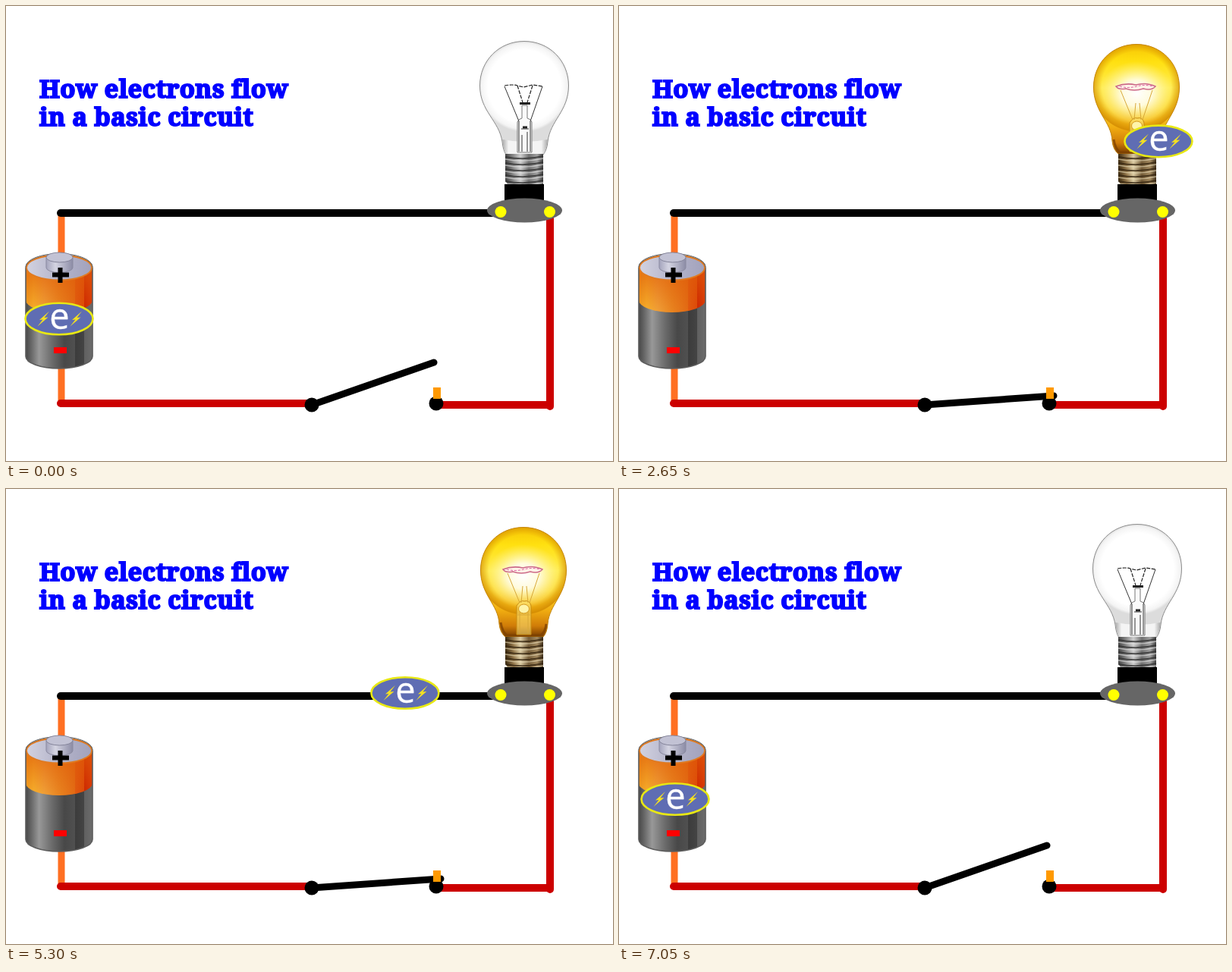
An HTML page for the animation above (7.1 s loop, 800 by 600 pixels).

```html
<!DOCTYPE html>
<html lang="en">
<head>
<meta charset="utf-8">
<title>How electrons flow in a basic circuit</title>
<style>
  html, body { margin: 0; width: 100%; height: 100%; overflow: hidden; background: #fff; }
  svg { display: block; width: 800px; height: 600px; }
  .title { font: bold 33px "Noto Serif", serif; letter-spacing: .34px; fill: #00f; stroke: #00f; stroke-width: 1.9; }
  .letter { font: 47px "Open Sans", "Noto Sans", sans-serif; fill: #fff; stroke: #fff; stroke-width: .4; text-anchor: middle; }
  .wire { fill: none; stroke-linecap: round; stroke-linejoin: round; }
</style>
</head>
<body>
<svg viewBox="0 0 800 600">
  <defs>
    <linearGradient id="orange">
      <stop offset="0" stop-color="#f0a020"/><stop offset=".12" stop-color="#f6b02c"/>
      <stop offset=".28" stop-color="#f0a038"/><stop offset=".5" stop-color="#e88420"/>
      <stop offset=".74" stop-color="#e26a14"/><stop offset=".74" stop-color="#e05a10"/>
      <stop offset=".88" stop-color="#dc4808"/><stop offset=".88" stop-color="#cc2400"/>
      <stop offset="1" stop-color="#d83808"/>
    </linearGradient>
    <linearGradient id="shade" x2="0" y2="1">
      <stop offset=".2" stop-color="#e05c08" stop-opacity=".6"/><stop offset="1" stop-color="#e05c08" stop-opacity="0"/>
    </linearGradient>
    <linearGradient id="grey">
      <stop offset="0" stop-color="#484848"/><stop offset=".08" stop-color="#666"/>
      <stop offset=".2" stop-color="#989898"/><stop offset=".4" stop-color="#6a6a6a"/>
      <stop offset=".58" stop-color="#484848"/><stop offset=".74" stop-color="#505050"/>
      <stop offset=".74" stop-color="#3c3c3c"/><stop offset=".88" stop-color="#444"/>
      <stop offset=".88" stop-color="#606060"/><stop offset="1" stop-color="#6c6c6c"/>
    </linearGradient>
    <linearGradient id="lid">
      <stop offset="0" stop-color="#d2d2e0"/><stop offset=".5" stop-color="#b4b4ca"/>
      <stop offset="1" stop-color="#a2a2bc"/>
    </linearGradient>
    <linearGradient id="knob">
      <stop offset="0" stop-color="#a4a4bc"/><stop offset=".35" stop-color="#d4d4e2"/>
      <stop offset="1" stop-color="#8c8ca6"/>
    </linearGradient>
    <radialGradient id="glass" gradientUnits="userSpaceOnUse" cx="683" cy="106" r="60">
      <stop offset=".8" stop-color="#fff"/><stop offset=".94" stop-color="#f4f4f4"/>
      <stop offset="1" stop-color="#dcdcdc"/>
    </radialGradient>
    <linearGradient id="neck" gradientUnits="userSpaceOnUse" x1="654" x2="714" y1="0" y2="0">
      <stop offset="0" stop-color="#a8a8a8"/><stop offset=".14" stop-color="#f4f4f4"/>
      <stop offset=".86" stop-color="#f4f4f4"/><stop offset="1" stop-color="#a8a8a8"/>
    </linearGradient>
    <linearGradient id="amber" gradientUnits="userSpaceOnUse" x1="0" x2="0" y1="50" y2="195">
      <stop offset="0" stop-color="#f6c404"/><stop offset=".16" stop-color="#ffe010"/>
      <stop offset=".4" stop-color="#ffec50"/><stop offset=".58" stop-color="#fcd830"/>
      <stop offset=".76" stop-color="#f0ac10"/><stop offset=".9" stop-color="#d07c08"/>
      <stop offset="1" stop-color="#783c00"/>
    </linearGradient>
    <radialGradient id="rim" gradientUnits="userSpaceOnUse" cx="682" cy="106" r="60">
      <stop offset=".76" stop-color="#d89000" stop-opacity="0"/><stop offset=".98" stop-color="#d08800" stop-opacity=".8"/>
      <stop offset="1" stop-color="#d08800" stop-opacity="0"/>
    </radialGradient>
    <radialGradient id="glow">
      <stop offset="0" stop-color="#fff"/><stop offset=".4" stop-color="#fffef0" stop-opacity=".9"/>
      <stop offset="1" stop-color="#fff8a0" stop-opacity="0"/>
    </radialGradient>
    <linearGradient id="steel">
      <stop offset="0" stop-color="#444"/><stop offset=".22" stop-color="#8c8c8c"/>
      <stop offset=".4" stop-color="#cfcfcf"/><stop offset=".62" stop-color="#707070"/>
      <stop offset=".84" stop-color="#a0a0a0"/><stop offset="1" stop-color="#404040"/>
    </linearGradient>
    <linearGradient id="bronze">
      <stop offset="0" stop-color="#3c2a10"/><stop offset=".22" stop-color="#94784c"/>
      <stop offset=".4" stop-color="#dccca4"/><stop offset=".62" stop-color="#745c38"/>
      <stop offset=".84" stop-color="#a48a60"/><stop offset="1" stop-color="#40301c"/>
    </linearGradient>
    <path id="bolt" d="M-13-10 -26 1.5 -21.5 1 -28.5 10 -14.500-2 -19.500-1.500Z" fill="#f4e020"/>
    <path id="envelope" d="M682 50.500C714 50.500 738.500 75 738.500 107C738.500 140 716 152 714 178Q713 190 708 195H658Q651 189 650 178C649 152 625.500 140 625.500 107C625.500 75 650 50.500 682 50.500Z"/>
  </defs>

  <rect width="800" height="600" fill="#fff"/>
  <g class="title">
    <text x="44" y="121">How electrons flow</text>
    <text x="44" y="158">in a basic circuit</text>
  </g>

  <!-- wires -->
  <path class="wire" stroke="#ff7022" stroke-width="9" d="M73 275V335M73 470V522"/>
  <path class="wire" stroke="#000" stroke-width="10" d="M72 273H645"/>
  <path class="wire" stroke="#c00" stroke-width="10" d="M72 524H403M572 526H717M717 273V528"/>

  <!-- switch -->
  <circle cx="403" cy="526" r="9.500"/>
  <circle cx="567" cy="524" r="9.500"/>
  <path id="arm" class="wire" stroke="#000" stroke-width="9" d="M403 526L564 470"/>
  <rect x="563" y="503" width="10" height="15" fill="#f90"/>

  <!-- battery -->
  <path fill="url(#grey)" d="M26 345V462A44 16 0 0 0 114 462V345Z"/>
  <path fill="url(#orange)" d="M26 345V388A44 16 0 0 0 114 388V345Z"/>
  <path fill="url(#shade)" d="M26 345V388A44 16 0 0 0 114 388V345Z"/>
  <path fill="none" stroke="#5c5c5c" stroke-width="1.600" d="M26 345V462A44 16 0 0 0 114 462V345A44 17 0 0 0 26 345"/>
  <ellipse cx="70" cy="345" rx="43" ry="16.500" fill="url(#lid)" stroke="#e07a20" stroke-width="1.800"/>
  <path fill="none" stroke="#6a6a6a" d="M26 344A44 17.500 0 0 1 114 344"/>
  <path fill="url(#knob)" stroke="#8a8aa0" d="M53 331V345A17.500 6.500 0 0 0 88 345V331Z"/>
  <ellipse cx="70.500" cy="331.500" rx="17.500" ry="6.500" fill="#c2c2d4" stroke="#84849a"/>
  <path stroke="#000" stroke-width="6" d="M61 354.500H83M71.500 345V365"/>
  <rect x="63" y="450" width="17" height="8" fill="#f00"/>

  <!-- unlit bulb -->
  <g id="unlit">
    <path fill="url(#glass)" stroke="#8c8c8c" d="M683 46.500C716 46.500 741.500 72 741.500 105C741.500 139 717 151 714 179Q713 190 708 196H659Q655 190 654 179C650 151 624.500 139 624.500 105C624.500 72 650 46.500 683 46.500Z"/>
    <path fill="url(#neck)" d="M654.500 176Q655 189 659 195.500H708Q713 189 713.500 176Q684 182 654.500 176Z"/>
    <path fill="#fafafa" stroke="#777" d="M674 193V153Q675 149 680 148V131H687V148Q692 149 693 153V193Z"/>
    <path fill="none" stroke="#333" d="M657 106L676 152V192M707 106L691 152V192M679 162H689M680 170V192M687 166V192"/>
    <path fill="none" stroke="#222" stroke-width="1.200" stroke-dasharray="5 1.500" d="M657 105Q668 103 674 105L682 107 694 104 707 106M674 105L681 127M694 105L687 127"/>
    <path stroke="#222" stroke-width="3" d="M677 128.500H691M681 160H687"/>
    <g class="screw" data-metal="steel" data-dark="#2c2c2c" data-light="#e8e8e8"></g>
  </g>

  <!-- lit bulb -->
  <g id="lit">
    <use href="#envelope" fill="url(#amber)" stroke="#c08410"/>
    <use href="#envelope" fill="url(#rim)"/>
    <ellipse cx="682" cy="115" rx="50" ry="42" fill="url(#glow)"/>
    <path fill="none" stroke="#7c4000" stroke-width="3" opacity=".75" d="M652 176Q654 188 660 193H705Q711 188 712 178"/>
    <path fill="#ffec80" fill-opacity=".5" stroke="#c88c10" d="M673 192V154Q678 146 683 148Q690 146 692 154V192Z"/>
    <path fill="none" stroke="#d8a838" d="M661 111L677 150M703 111L690 150M681 128L679 150M686 128L688 150M677 156V190M688 156V190M673 166H692"/>
    <ellipse cx="682.500" cy="158" rx="7" ry="6" fill="#fff4a8" stroke="#d49a20"/>
    <path fill="#fff2e8" stroke="#cc6a88" stroke-width="1.500" d="M655 106Q668 101 681 104Q695 100 707 106Q702 112 691 109Q679 113 668 109Q659 111 655 106Z"/>
    <path fill="none" stroke="#d85aa0" stroke-dasharray="3 2" d="M660 106Q671 109 682 106T704 106"/>
    <g class="screw" data-metal="bronze" data-dark="#30200c" data-light="#ece0bc"></g>
  </g>

  <!-- socket -->
  <rect x="657" y="235" width="52" height="24"/>
  <ellipse cx="683.500" cy="269.500" rx="49.500" ry="16" fill="#666"/>
  <circle cx="652" cy="271.500" r="7.500" fill="#ff0"/>
  <circle cx="716.500" cy="271.500" r="7.500" fill="#ff0"/>

  <g id="electron">
    <ellipse rx="44.500" ry="20.800" fill="#5f6db3" stroke="#e8e814" stroke-width="2.600"/>
    <use href="#bolt"/>
    <use href="#bolt" x="43"/>
    <text class="letter" x=".5" y="13">e</text>
  </g>
</svg>
<script>
  const LOOP = 7100, STEP = 50;
  const CLOSE = 1050, LIGHT = 2250, RESET = 7050;

  // time, x, y
  const route = [
    [0, 70, 412.5], [450, 70, 412.5], [1050, 70.5, 530], [1750, 711, 530],
    [2250, 711, 271], [2950, 711, 109], [3700, 644, 109], [4400, 644, 109],
    [5000, 644, 269], [5950, 270, 269], [6450, 74, 269], [7050, 74, 409], [LOOP, 74, 409]
  ];

  const byId = id => document.getElementById(id);
  const arm = byId("arm"), lit = byId("lit"), unlit = byId("unlit"), electron = byId("electron");

  // screw threads
  for (const g of document.querySelectorAll(".screw")) {
    const { metal, dark, light } = g.dataset;
    let parts = `<path fill="url(#${metal})" d="M658 195H708V235H661L658 230Z"/>`;
    for (let y = 199; y < 234; y += 8) {
      const curve = dy => `M658 ${y + dy}Q683 ${y + dy + 5} 708 ${y + dy - 1}`;
      parts += `<path fill="none" stroke="${dark}" stroke-width="2" opacity=".75" d="${curve(0)}"/>`
        + `<path fill="none" stroke="${light}" stroke-width="1.500" opacity=".6" d="${curve(3)}"/>`;
    }
    g.innerHTML = parts;
  }

  function place(t) {
    const i = route.findIndex(key => key[0] > t);
    const [t0, x0, y0] = route[i - 1], [t1, x1, y1] = route[i];
    const k = (t - t0) / (t1 - t0);
    return [x0 + (x1 - x0) * k, y0 + (y1 - y0) * k];
  }

  function draw() {
    const t = Math.floor(performance.now() % LOOP / STEP) * STEP;
    const closed = t >= CLOSE && t < RESET;
    const glowing = t >= LIGHT && t < RESET;
    arm.setAttribute("d", closed ? "M403 526L573 514" : "M403 526L564 470");
    lit.style.display = glowing ? "" : "none";
    unlit.style.display = glowing ? "none" : "";
    electron.setAttribute("transform", `translate(${place(t)})`);
    requestAnimationFrame(draw);
  }
  draw();
</script>
</body>
</html>
```
